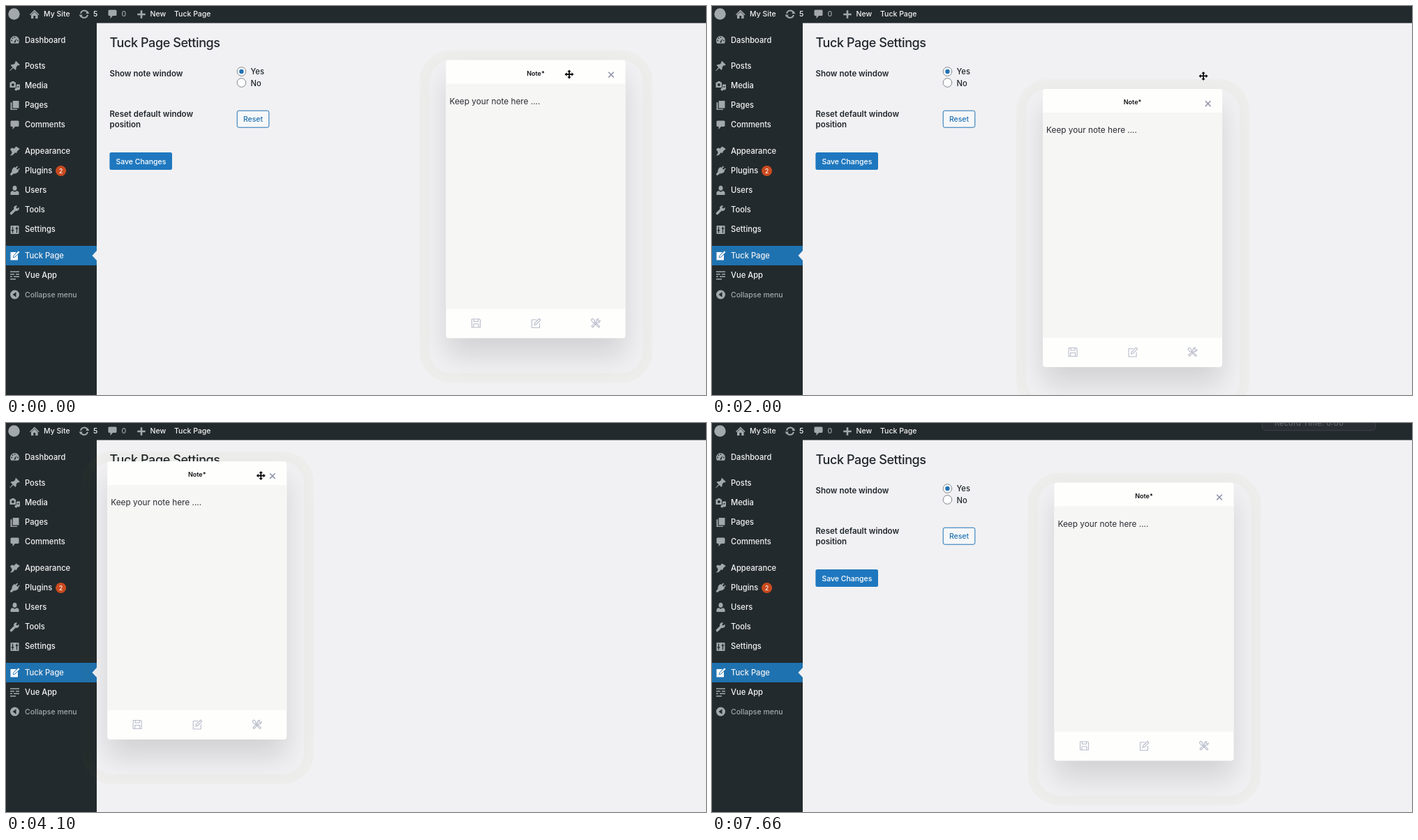
Write an HTML page that moves like this. It is 1003 px wide and 558 px high and loops after 7.73 s.

```html
<!DOCTYPE html>
<html lang="en">
<head>
<meta charset="utf-8">
<title>Note window</title>
<style>
  html, body { margin: 0; width: 100%; height: 100%; overflow: hidden; background: #f1f1f3; }
  #stage { position: absolute; left: 0; top: 0; width: 1003px; height: 558px; overflow: hidden; }
  svg { position: absolute; left: 0; top: 0; overflow: visible; display: block; }
  text { font: 500 11.2px Inter, sans-serif; font-optical-sizing: none; white-space: pre; }
  .dark { fill: #232a2d; }
  .ink { fill: #20262b; }
  .bold { font-weight: 600; font-size: 11.5px; }
  .small { font-size: 10.5px; }
  .title { font-size: 18px; letter-spacing: -.4px; }
  .light text { fill: #f2f2f3; }
  .light .dim { fill: #a3a8ac; }
  .icons { fill: #a3a8ac; }
  .icons .hole { fill: #232a2d; }
  .icons .on { fill: #fff; }
  .line { fill: none; stroke: #a3a8ac; }
  #note { position: absolute; left: 0; top: 0; width: 257px; height: 399px; }
  #note .halo { position: absolute; left: -38.5px; top: -14px; width: 306px; height: 449px;
    border: 14px solid rgba(110, 110, 0, .026); border-radius: 46px; }
  #note .face { position: absolute; inset: 0; border-radius: 4px; background: #fefefd;
    box-shadow: 0 25px 40px rgba(0, 0, 10, .13); }
  #note .body { position: absolute; left: 0; top: 34px; width: 257px; height: 323px; background: #f6f6f5; }
  #tools { fill: none; stroke: #b9bccb; stroke-width: 1.1; stroke-linejoin: round; }
</style>
</head>
<body>
<div id="stage">
  <svg width="1003" height="558" viewBox="0 0 1003 558">
    <rect width="1003" height="558" fill="#f1f1f3"/>
    <text class="ink title" x="148.5" y="59.3">Tuck Page Settings</text>
    <text class="ink bold" x="148.5" y="101.3">Show note window</text>
    <text class="ink bold" x="148.5" y="158.5">Reset default window</text>
    <text class="ink bold" x="148.5" y="173.5">position</text>
    <g fill="#fff" stroke="#80868c">
      <circle cx="337.4" cy="94" r="6.3"/>
      <circle cx="337.4" cy="110" r="6.3"/>
    </g>
    <circle cx="337.4" cy="94" r="3.2" fill="#1f72b4"/>
    <text class="ink" x="350.5" y="98.2">Yes</text>
    <text class="ink" x="350.5" y="115">No</text>
    <rect x="331.2" y="150.2" width="45.6" height="24" rx="2.5" fill="#f6f7f8" stroke="#1f72b4"/>
    <text class="small" x="354" y="166" text-anchor="middle" fill="#1f72b4">Reset</text>
    <rect x="148.4" y="210" width="89.6" height="25" rx="2.5" fill="#1f78bf"/>
    <text class="small" x="157.4" y="226.8" fill="#fff">Save Changes</text>

    <path class="dark" d="M0 0H1003V24.5H130V558H0z"/>
    <rect y="344" width="130" height="28" fill="#1f72b0"/>
    <path d="M130 351l-6.5 7 6.5 7z" fill="#f1f1f3"/>

    <g class="icons">
      <circle cx="11.5" cy="11.5" r="8.2"/>
      <path d="M34 12.2l6.8-6.6 6.8 6.6-1 1-5.8-5.5-5.8 5.5zM36 13l4.8-4.5 4.8 4.5v5h-3.4v-4h-2.8v4H36z"/>
      <path class="line" stroke-width="1.9" d="M107 10.7a5.2 5.2 0 0 1 9.6-1.5M117 12.7a5.2 5.2 0 0 1-9.6 1.5"/>
      <path d="M114.3 11h5l-2.2-4zM104.7 12.4h5l-2.8 4z"/>
      <path d="M148 5.5h9q1.500 0 1.500 1.500v5.500q0 1.500-1.500 1.500h-4l-3.500 4v-4H148q-1.500 0-1.500-1.500V7q0-1.500 1.500-1.500z"/>
      <path d="M192.7 6.3h2.6v4.4h4.4v2.6h-4.4v4.4h-2.6v-4.400h-4.400v-2.600h4.400z"/>

      <g transform="translate(12.5 48.5)">
        <path d="M-6.5 1a6.5 6.5 0 1 1 13 0q0 2.5-1.3 4.2H-5.2Q-6.5 3.5-6.5 1z"/>
        <path class="hole" d="M-.9 2.8L3.2-2.5 1 3.6a1 1 0 0 1-1.9-.8z"/>
        <g class="hole"><circle cx="-4.3" cy="1" r=".9"/><circle cx="-3" cy="-2.3" r=".9"/><circle cy="-3.7" r=".9"/><circle cx="4.4" cy="1" r=".9"/></g>
      </g>
      <path transform="translate(12.5 86)" d="M1.7-7.3L7.3-1.7 5.8-.6 4.6-.9 2.2 1.5Q2.800 4.200 1 6L-2 3-6.800 7.300-7.300 6.800-3 2-6 -1Q-4.200-2.800-1.500-2.200L.9-4.600.6-5.800z"/>
      <g transform="translate(12.5 114)">
        <path d="M-7-4.5h2l1-1.5h3l1 1.5h1.5V3H-7z"/>
        <circle class="hole" cx="-2.6" cy="-1" r="2"/>
        <path d="M2.5-1.5H7.5V4.5a2 2 0 1 1-1.5-2V1H4V5.5a2 2 0 1 1-1.5-2z"/>
      </g>
      <g transform="translate(12.5 142)"><path d="M-2.8-6H6V4.500H-2.800z"/><path d="M-6-3.8h2v9.5h7.500v1.300H-6z"/></g>
      <path transform="translate(12.5 170.5)" d="M-4.5-6h9Q6-6 6-4.5V1Q6 2.5 4.5 2.5H.5L-3 6.5v-4h-1.5Q-6 2.5-6 1v-5.5Q-6-6-4.5-6z"/>
      <path transform="translate(12.5 208)" d="M2-6.5L7.3-3 3.800 0 2.500 3 .2 2.300Q-2 6.800-7 6.500-3.800 4.500-4 1.500L-6.500-2.500-4-4.500-1-3.500z"/>
      <path transform="translate(12.5 236)" d="M3.5-6.5l1.2 1L2.4-2.8 3.9-1.3 6.4-3.6l1 1.1L5-.2l.7.8Q3.5 5-1 4.3L-5 7.3-6.8 5.5l2.7-3.7Q-4.5-2.5-.4-5l1.3 1z"/>
      <g transform="translate(12.5 264.5)"><ellipse cy="-3.2" rx="3" ry="3.5"/><path d="M-6 6.5V3.800Q-6 1-2.800.7L0 2.200 2.800.7Q6 1 6 3.800v2.700z"/></g>
      <path transform="translate(12.5 292.5)" d="M6-3.7L3.5-1.8 1.8-3.5 3.7-6Q.5-7-1-4.5-1.7-3-1.2-1.3L-6.3 3.7a1.8 1.8 0 0 0 2.6 2.6L1.3 1.2Q3 1.7 4.5 1 7-.5 6-3.7z"/>
      <g transform="translate(12.5 321)">
        <rect x="-6" y="-6" width="12" height="12" rx="1"/>
        <path class="hole" d="M-3.6-4.5h1.2v9h-1.2zM2.4-4.5h1.2v9H2.4zM-4.7 0h3.4v1.5h-3.4zM1.3-2.5h3.4V-1H1.3z"/>
      </g>
      <path class="on" transform="translate(12.5 358)" d="M-6-5H2.5L-2 0-2.8 3.3.5 2.5 4.5-1.5V6.5H-6zM5.3-6.5L7-4.8 0 1.8-1.8 2.2-1.3.3z"/>
      <path transform="translate(12.5 386)" d="M-6.5-5.5h13v1.4h-13zM-6.5-2h6v1.4h-6zM1.5-2h5v1.4h-5zM-6.5 1.5h3v1.4h-3zM-1.5 1.5h8v1.4h-8zM-6.5 5h8v1.4h-8z"/>
      <g transform="translate(12.5 414)"><circle r="6.5"/><path class="hole" d="M-3 0L2-3.7V3.7z"/></g>
    </g>
    <circle cx="78.6" cy="236.5" r="7.5" fill="#ca4a1f"/>
    <text x="78.6" y="239.7" text-anchor="middle" fill="#fff" style="font-size:8.5px">2</text>
    <g class="light" id="menu"></g>
  </svg>

  <div id="note">
    <div class="halo"></div>
    <div class="face"></div>
    <div class="body"></div>
    <svg width="257" height="399">
      <text x="128.5" y="22.3" text-anchor="middle" fill="#101014" style="font-size:9px;font-weight:600">Note*</text>
      <path d="M232.8 17.3l7.6 7.6m0-7.6l-7.6 7.6" stroke="#8d92a8" stroke-width="1.5"/>
      <text x="5" y="63.2" fill="#2b2c33" style="font-size:11.8px;font-weight:400">Keep your note here ....</text>
      <g id="tools">
        <path transform="translate(43 377.5)" d="M-6-6H4.5L6-4.500V6H-6zM-3-6v3.500h6V-6M-3.500 6V1h7V6"/>
        <path transform="translate(129 377.5)" d="M1-5H-6V6.5H5V0M-2.5 2.8L-1.8 0 4.6-6.5 6.5-4.6 0 2z"/>
        <g transform="translate(214.5 377.5)">
          <path d="M-6-5.8l1.5-.7 3 3v1.6L5.8 4.6 4.4 6.2-2.6-1h-1.6L-6.5-4.3z"/>
          <path d="M6.3-4L4.3-2.5 2.5-4.3 4-6.3Q1.5-6.5.8-4.5L1-2.5-6 4.3-4.3 6 2.5-1l2 .2Q6.5-1.5 6.3-4z"/>
        </g>
      </g>
    </svg>
  </div>

  <svg width="1003" height="558">
    <g id="recorder">
      <rect x="788.5" y="-30" width="162" height="40.7" rx="5" fill="#292e35" stroke="#3d4249"/>
      <text x="806" y="3.6" fill="#5d6269">Record Time: 0:00</text>
    </g>
    <path id="pointer" fill="#0c0c0e" stroke="#fff" stroke-width=".8" paint-order="stroke"
      d="M0-6.5L2.7-3.5H.9V-.9H3.5V-2.7L6.5 0 3.5 2.7V.9H.9V3.5H2.7L0 6.5-2.7 3.5H-.9V.9H-3.5V2.7L-6.5 0-3.5-2.7V-.9H-.9V-3.5H-2.7z"/>
  </svg>
</div>
<script>
const LOOP = 7730, STEP = LOOP / 232;
const GRAB = [184, 20.5];
const $ = id => document.getElementById(id);

function label(x, y, str, cls = '') {
  const el = document.createElementNS('http://www.w3.org/2000/svg', 'text');
  el.setAttribute('x', x);
  el.setAttribute('y', y);
  el.setAttribute('class', cls);
  el.textContent = str;
  $('menu').append(el);
}

const menu = [['Dashboard'], ['Posts', 'Media', 'Pages', 'Comments'],
  ['Appearance', 'Plugins', 'Users', 'Tools', 'Settings'], ['Tuck Page', 'Vue App']];
let row = 52.5;
for (const group of menu) {
  for (const name of group) {
    label(27, row, name);
    row += 28.15;
  }
  row += 9.2;
}
label(27, 417.6, 'Collapse menu', 'small dim');
label(54, 15.4, 'My Site', 'small');
label(125, 15.4, '5', 'small');
label(165.5, 15.4, '0', 'small dim');
label(206.5, 15.4, 'New', 'small');
label(241, 15.4, 'Tuck Page', 'small');

// Rows are time, x, y of the note window.
const sweep = [
  [600, 630.5, 77.5], [750, 600, 68], [950, 480, 46], [1250, 308, 58], [1366, 258, 71.5],
  [1400, 192, 77], [1480, 150, 100], [1750, 300, 168], [1999, 474, 119], [2120, 535, 45],
  [2230, 523, 10], [2300, 490, 0], [2480, 340, 25], [2700, 205, 55], [2866, 158, 64.5],
  [3000, 135, 67.5], [3400, 47, 55]];
const back = [
  [3935, 47, 55], [4000, 29, 54], [4098, 145, 55], [4300, 330, 58], [4740, 656, 68],
  [4830, 640, 95], [5000, 580, 113], [5300, 490.5, 85.5]];
// How far the pointer runs ahead of the window.
const lead = [
  [630, 0, 0], [1366, -17, 5.5], [1480, 0, 5], [1999, 46, -39], [2230, -8, -5], [2866, -7, 0],
  [3400, 0, 0], [3940, 0, 0], [4098, 36, 0], [4740, 0, 0], [5300, 0, 0]];

// Cubic through the rows that rests at ends and turning points.
function follow(rows, t) {
  const last = rows.length - 1;
  if (t <= rows[0][0]) return rows[0].slice(1);
  if (t >= rows[last][0]) return rows[last].slice(1);
  const i = rows.findIndex(r => r[0] > t) - 1;
  const slope = (n, c) => (rows[n + 1][c] - rows[n][c]) / (rows[n + 1][0] - rows[n][0]);
  const tangent = (n, c) => {
    if (n === 0 || n === last) return 0;
    const a = slope(n - 1, c), b = slope(n, c);
    return a * b > 0 ? 2 * a * b / (a + b) : 0;
  };
  const span = rows[i + 1][0] - rows[i][0], u = (t - rows[i][0]) / span, v = 1 - u;
  return [1, 2].map(c =>
    rows[i][c] * v * v * (1 + 2 * u) + rows[i + 1][c] * u * u * (3 - 2 * u) +
    span * u * v * (tangent(i, c) * v - tangent(i + 1, c) * u));
}

const ramp = (t, from, to) => Math.min(1, Math.max(0, (t - from) / (to - from)));

function draw(now) {
  const t = Math.floor((now % LOOP + 7) / STEP) % 232 * STEP;
  const [x, y] = follow(t < 3700 ? sweep : back, t);
  const [dx, dy] = follow(lead, t);
  const exit = ramp(t, 5600, 5700);
  const px = x + GRAB[0] + dx - 7.5 * (1 - ramp(t, 0, 133)) + 45 * exit;
  const py = y + GRAB[1] + dy - 80 * exit;
  $('note').style.transform = `translate(${x}px, ${y}px)`;
  $('pointer').setAttribute('transform', `translate(${px} ${py})`);
  $('pointer').style.display = t < 5725 ? '' : 'none';
  $('recorder').style.opacity = t < 6425 ? 0 : .8 + .2 * ramp(t, 7570, 7660);
}

const start = performance.now();
function tick() {
  draw(performance.now() - start);
  requestAnimationFrame(tick);
}
tick();
</script>
</body>
</html>
```
